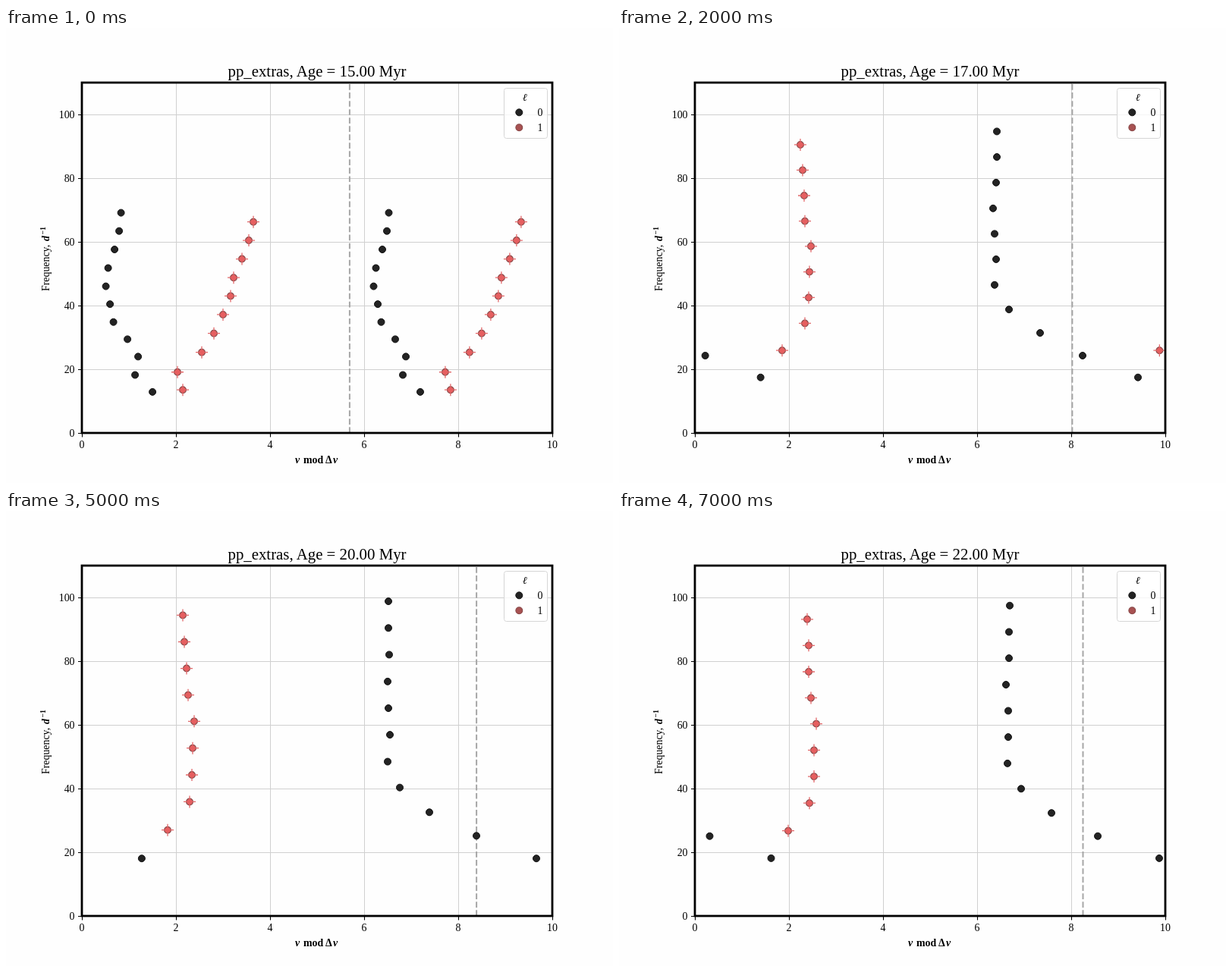
An HTML page for the animation above (8 s loop, 800 by 600 pixels).

```html
<!DOCTYPE html>
<html lang="en">
<head>
<meta charset="utf-8">
<title>Echelle diagram</title>
<style>
  html, body { margin: 0; width: 100%; height: 100%; overflow: hidden; background: #fefefe; }
  svg { display: block; }
  text { font: 13.89px "Liberation Serif", "Times New Roman", serif; fill: #000; }
  .title { font-size: 20.83px; }
  .bold { font-weight: bold; }
  .math { font-weight: bold; font-style: italic; }
  .mid { text-anchor: middle; }
  .end { text-anchor: end; }
</style>
</head>
<body>
<svg width="800" height="600" viewBox="0 0 800 600">
  <defs>
    <clipPath id="area"><rect x="100" y="72" width="620" height="462"/></clipPath>
    <circle id="dot0" r="4.5" fill="#232323" stroke="#111" stroke-width="1"/>
    <circle id="dot1" r="4.4" fill="#a85252" stroke="#864444" stroke-width="1.1"/>
    <g id="mode0"><use href="#dot0"/></g>
    <g id="mode1">
      <use href="#dot1"/>
      <path d="M-8 0H8M0 -8V8" stroke="#e2686a" stroke-width="1.3"/>
      <circle r="3.5" fill="#e65f60"/>
    </g>
  </defs>

  <g id="grid" stroke="#d0d0d0"></g>
  <g clip-path="url(#area)">
    <path id="fold" stroke="#a6a6a6" stroke-width="2" stroke-dasharray="7.7 3.33"/>
    <g id="modes"></g>
  </g>
  <g id="ticks" stroke="#000" stroke-width="1.1"></g>
  <rect x="100" y="72" width="620" height="462" fill="none" stroke="#000" stroke-width="2.8"/>
  <g id="labels"></g>

  <rect x="656.5" y="79.5" width="57" height="66" rx="3" fill="#fff" fill-opacity=".8" stroke="#d6d6d6"/>
  <text class="math mid" x="684" y="96">ℓ</text>
  <use href="#dot0" x="676.3" y="111.3"/>
  <use href="#dot1" x="676.3" y="131.3"/>
  <text class="mid" x="704" y="116">0</text>
  <text class="mid" x="704" y="136">1</text>

  <text id="title" class="title mid" x="410" y="64"></text>
  <text y="574"><tspan class="math" x="381">ν</tspan><tspan class="bold" x="392">mod</tspan><tspan class="bold" x="421">Δ</tspan><tspan class="math" x="431">ν</tspan></text>
  <g transform="translate(57 347) rotate(-90)">
    <text>Frequency,</text>
    <text class="math" x="66">d</text>
    <text class="bold" x="74.5" y="-5" style="font-size:9.72px">−1</text>
  </g>
</svg>
<script>
const $ = id => document.getElementById(id);
const X0 = 100, Y0 = 534, SX = 62, SY = 4.2, STEP = 1000;

// sep: large separation; l0, l1: folded position of each radial order, in stage x
const models = [
  { sep: 5.692,
    l0: [546, 523, 527, 513, 494.5, 490, 484.5, 487.5, 496, 502, 504.5],
    l1: [233, 226, 258, 274, 286, 296, 300, 311, 320, 326] },
  { sep: 6.645,
    l0: [631, 582, 562, 532, 507, 501, 500, 499, 508, 515.5, 521],
    l1: [235, 265, 282, 287, 296, 296, 300, 308, 312] },
  { sep: 8.022,
    l0: [684, 611, 555, 514, 495, 497, 495, 493, 497, 498, 498],
    l1: [215, 245, 250, 253 - 2, 253, 245, 244, 242, 239] },
  { sep: 8.626,
    l0: [697, 614, 548, 511, 498, 504, 500, 500, 500, 499, 497],
    l1: [205, 234, 234, 237, 236, 228, 226, 221, 218] },
  { sep: 8.389,
    l0: [699, 620, 558, 519, 503, 506, 504, 503, 505, 504, 504],
    l1: [213, 242, 245, 246, 248, 240, 238, 235, 233] },
  { sep: 8.25,
    l0: [712, 631, 570, 530, 512, 513, 513, 510, 514, 514, 515],
    l1: [223, 251, 257, 257, 260, 253, 250, 250, 248] }
];

function blend(a, b, w) {
  const mix = (p, q) => p + (q - p) * w;
  const mixAll = key => a[key].map((v, i) => mix(v, b[key][i]));
  return { sep: mix(a.sep, b.sep), l0: mixAll("l0"), l1: mixAll("l1") };
}
models.splice(5, 0, blend(models[4], models[5], 0.46));
models.splice(4, 0, blend(models[3], models[4], 0.4));

function drawAxes() {
  let grid = "", ticks = "", labels = "";
  for (let i = 0; i <= 5; i++) {
    const x = X0 + i * 124, y = Y0 - i * 84;
    if (i > 0) grid += `<path d="M100 ${y + 0.5}H720"/>`;
    if (i > 0 && i < 5) grid += `<path d="M${x + 0.5} 72V534"/>`;
    ticks += `<path d="M${x + 0.5} 534v5.4M100 ${y + 0.5}h-5"/>`;
    labels += `<text class="mid" x="${x}" y="554">${i * 2}</text>` +
              `<text class="end" x="90.5" y="${y + 5}">${i * 20}</text>`;
  }
  $("grid").innerHTML = grid;
  $("ticks").innerHTML = ticks;
  $("labels").innerHTML = labels;
}

// Each mode appears at its frequency modulo sep, and once more a period to the right.
function modeMarks(list, sep, id) {
  return list.map((px, i) => {
    const order = 12 - list.length + i;
    const freq = (px - X0) / SX + order * sep;
    const y = Y0 - freq * SY, fold = freq % sep;
    return [fold, fold + sep].filter(v => v < 10.2).map(v =>
      `<use href="#${id}" x="${(X0 + v * SX).toFixed(2)}" y="${y.toFixed(2)}"/>`).join("");
  }).join("");
}

function show(i) {
  const { sep, l0, l1 } = models[i];
  $("title").textContent = `pp_extras, Age = ${(15 + i).toFixed(2)} Myr`;
  $("fold").setAttribute("d", `M${X0 + sep * SX} 534V72`);
  $("modes").innerHTML = modeMarks(l0, sep, "mode0") + modeMarks(l1, sep, "mode1");
}

let shown = -1;
const start = performance.now();
function tick() {
  const i = Math.floor((performance.now() - start) / STEP) % models.length;
  if (i !== shown) show(shown = i);
  requestAnimationFrame(tick);
}
drawAxes();
tick();
</script>
</body>
</html>
```
